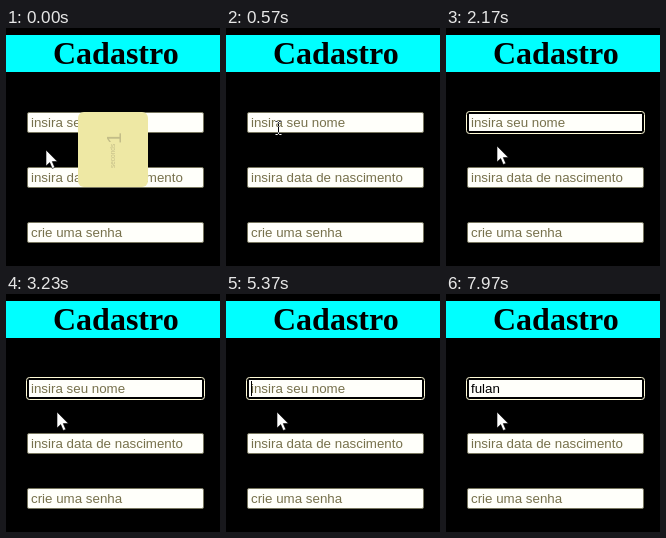
These frames come from a looping animation (214x238 px, 8000 ms). An HTML page:

```html
<!DOCTYPE html>
<html lang="pt">
<head>
<meta charset="utf-8">
<title>Cadastro</title>
<style>
  html, body { margin: 0; width: 100%; height: 100%; overflow: hidden; background: #000; }
  svg { display: block; width: 100vw; height: 100vh; }
  .title { font: bold 32px "Liberation Serif", "Times New Roman", serif; }
  .field text { font: 13.333px "Liberation Sans", Arial, sans-serif; fill: #77714c; }
  .field .typed { fill: #000; }
  .box { fill: #fffffa; stroke: #77765f; }
  .badge text { font-family: "Liberation Sans", Arial, sans-serif; fill: #c3bd88; }
  #beam { mix-blend-mode: difference; }
</style>
</head>
<body>
<svg viewBox="0 0 214 238">
  <rect width="214" height="238"/>
  <rect y="7" width="214" height="37" fill="#0ff"/>
  <text class="title" x="47" y="36">Cadastro</text>
  <g id="form"></g>
  <g id="badge" class="badge">
    <rect x="72" y="84" width="70" height="75" rx="6" fill="#eee8a4"/>
    <text transform="translate(115 116) rotate(-90)" font-size="21">1</text>
    <text transform="translate(109 140) rotate(-90)" font-size="6.5">seconds</text>
  </g>
  <path id="arrow" d="M0 0V16L3.7 12.6L6.2 18.5L8.8 17.4L6.3 11.6H11.4Z" fill="#fff" stroke="#000" stroke-width=".6"/>
  <path id="beam" d="M-3 -6.5H-1L0 -5.5L1 -6.5H3M0 -5.5V5.5M-3 6.5H-1L0 5.5L1 6.5H3" fill="none" stroke="#fff"/>
</svg>
<script>
const LOOP = 8000;
const FOCUS = 790;
const WORD = "fulan";
const KEYS = [5760, 5960, 6180, 6400, 6620];
// Times at which the caret turns on or off, starting with on
const BLINKS = [FOCUS, 2160, 3240, 4300, 5360, 7680];
// Pointer positions: time, x, y
const PATH = [[0, 40, 122], [150, 40, 122], [500, 52, 100], [950, 52, 100], [1300, 51, 118], [LOOP, 51, 118]];

const $ = id => document.getElementById(id);
const clamp = v => Math.max(0, Math.min(1, v));
const show = (el, on) => el.setAttribute("visibility", on ? "visible" : "hidden");

$("form").innerHTML = ["insira seu nome", "insira data de nascimento", "crie uma senha"]
  .map((label, i) => `<g class="field" transform="translate(21 ${84 + 55 * i})">
    <rect class="box" x=".5" y=".5" width="176" height="20" rx="1.5"/>
    ${i ? "" : `<g id="ring">
      <rect x="-.5" y="-.5" width="178" height="22" rx="3" stroke="#fffbd6"/>
      <rect x="2" y="2" width="173" height="17" fill="#fffffa"/></g>`}
    <text ${i ? "" : 'id="hint"'} x="4" y="15">${label}</text>
    ${i ? "" : `<text id="typed" class="typed" x="4" y="15"></text>
      <rect id="caret" y="3" width="1" height="15"/>`}
  </g>`).join("");

function pointerAt(t) {
  const i = PATH.findIndex(p => p[0] > t);
  const [a, b] = [PATH[i - 1], PATH[i]];
  const u = clamp((t - a[0]) / (b[0] - a[0]));
  const ease = u * u * (3 - 2 * u);
  return [1, 2].map(k => a[k] + (b[k] - a[k]) * ease);
}

function draw(t) {
  const count = KEYS.filter(k => k <= t).length;
  $("typed").textContent = WORD.slice(0, count);
  show($("hint"), !count);
  show($("ring"), t >= FOCUS);

  show($("caret"), BLINKS.filter(b => b <= t).length % 2);
  const width = count ? $("typed").getComputedTextLength() : 0;
  $("caret").setAttribute("x", Math.round(4 + width));

  $("badge").setAttribute("opacity", 1 - clamp((t - 30) / 300));

  const [x, y] = pointerAt(t);
  const overField = y > 84 && y < 105;
  for (const id of ["arrow", "beam"]) {
    $(id).setAttribute("transform", `translate(${Math.round(x) + (id === "beam" ? .5 : 0)} ${Math.round(y)})`);
    show($(id), overField === (id === "beam"));
  }
}

const start = performance.now();
function tick() {
  draw((performance.now() - start) % LOOP);
  requestAnimationFrame(tick);
}
tick();
</script>
</body>
</html>
```
